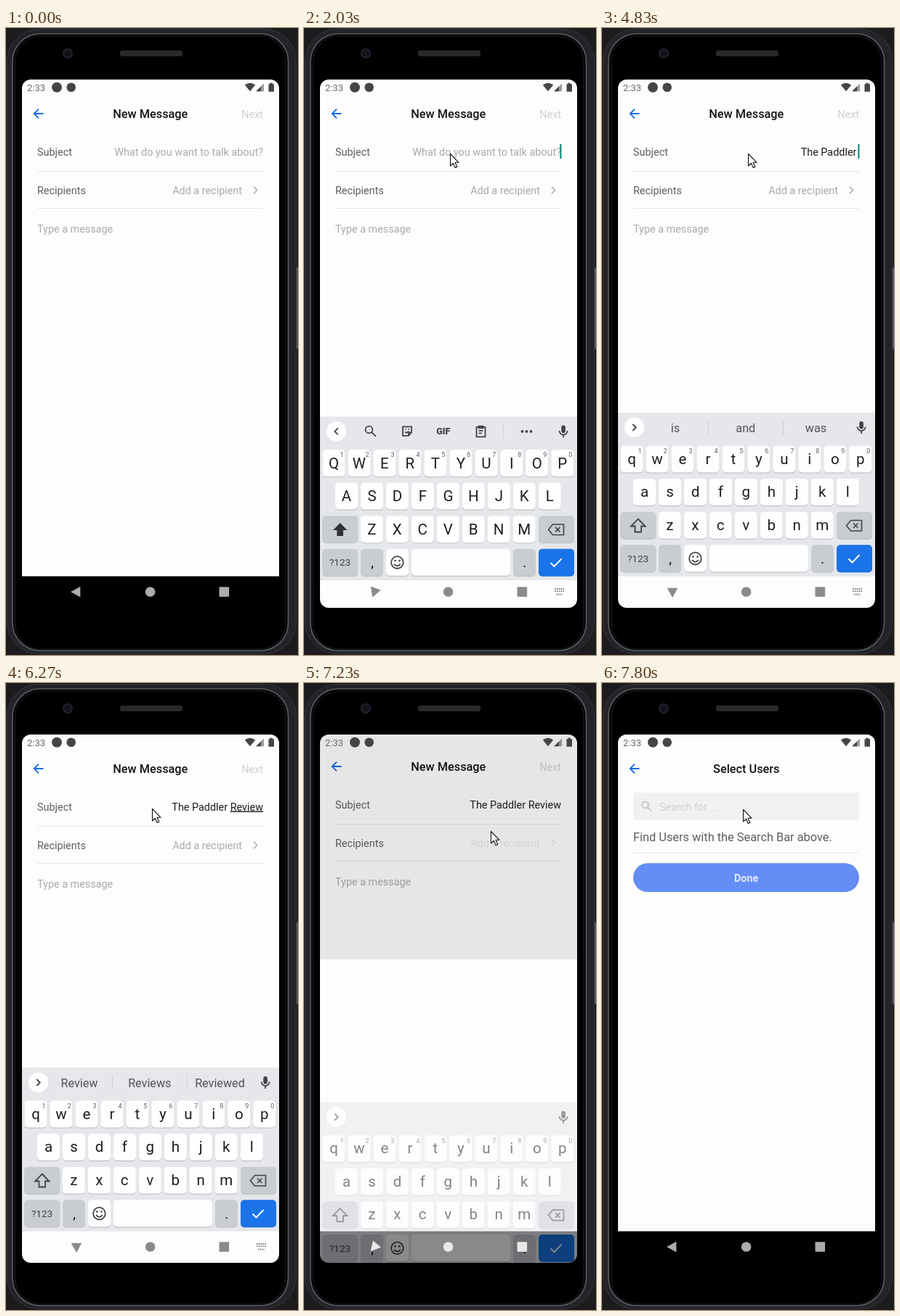
An HTML page for the animation above (8 s loop, 402x864 px).

```html
<!DOCTYPE html>
<html lang="en">
<head>
<meta charset="utf-8">
<title>New Message</title>
<style>
html, body { margin: 0; width: 100%; height: 100%; overflow: hidden; background: #1c1c1e; }
svg { display: block; width: 402px; height: 864px; font-family: Roboto, sans-serif; font-size: 14.4px; }
text { white-space: pre; }
.title { font-size: 16.3px; font-weight: 500; fill: #141414; }
.label { fill: #5e5e60; }
.hint { fill: #a9a9b0; }
.mid { text-anchor: middle; }
.end { text-anchor: end; }
.rule { stroke: #e4e4e6; fill: none; }
.line { fill: none; stroke: #414347; stroke-width: 1.8; }
.key { fill: #fefefe; }
.alt { fill: #c9ccd1; }
.glyph { font-size: 20.5px; fill: #1c1d1f; }
.digit { font-size: 9px; fill: #5c5e62; }
.word { font-size: 16.2px; fill: #505256; }
.back { fill: none; stroke: #1c6ee6; stroke-width: 1.9; }
</style>
</head>
<body>
<svg id="stage" viewBox="0 0 402 864"></svg>
<script>
const LOOP = 8000, KB_HEIGHT = 269, VIEW = 459;
const PAPER = 'fill="#fdfdfd"', INK = 'fill="#414347"';
const SUBJECT = 'The Paddler Review';
const KEY_TIMES = [2700, 2900, 3100, 3370, 3730, 4000, 4130, 4270, 4400, 4530,
  4700, 4800, 5070, 5270, 5330, 5400, 5470, 5570];
const SUGGESTIONS = [
  [2700, 'To|The|This'], [2930, 'that|the|they'], [3170, 'they|The|then'],
  [3430, 'one|Paddler|only'], [3830, 'Part|Place|Past'], [4030, 'Part|Paper|Past'],
  [4170, 'Pads|Pad|Paddle'], [4300, 'Paddle|Paddy|Paddles'], [4570, 'Paddler|Paddle|Paddles'],
  [4830, 'is|and|was'], [5100, 'Road|River|Run'], [5300, 'Real|Read|Red'],
  [5400, 'Review|Rev|Reveal'], [5770, 'Review|Reviews|Reviewed'], [7100, '||']
];
const POINTER = [[730, 10, 206], [1170, 201, 173], [6470, 201, 173], [6800, 260, 214],
  [6930, 257, 204], [7350, 257, 204], [7760, 194, 174]];

const $ = id => document.getElementById(id);
const ramp = (t, a, b) => Math.min(1, Math.max(0, (t - a) / (b - a)));
const smooth = (t, a, b) => { const p = ramp(t, a, b); return p * p * (3 - 2 * p); };
const last = (list, t) => list.filter(item => item[0] <= t).pop();

// cubic-bezier(.208, .82, .25, 1), solved for x by bisection
function reveal(x) {
  const curve = (s, a, b) => 3 * a * s * (1 - s) ** 2 + 3 * b * s * s * (1 - s) + s ** 3;
  let lo = 0, hi = 1;
  for (let i = 0; i < 20; i++) {
    const s = (lo + hi) / 2;
    if (curve(s, .208, .25) < x) lo = s; else hi = s;
  }
  return x >= 1 ? 1 : curve(lo, .82, 1);
}

const text = (x, y, s, cls = '', extra = '') => `<text x="${x}" y="${y}" class="${cls}" ${extra}>${s}</text>`;
const path = (d, cls = 'line', extra = '') => `<path d="${d}" class="${cls}" ${extra}/>`;
const rect = (x, y, w, h, r, extra) => `<rect x="${x}" y="${y}" width="${w}" height="${h}" rx="${r}" ${extra}/>`;
const circle = (x, y, r, extra) => `<circle cx="${x}" cy="${y}" r="${r}" ${extra}/>`;

const header = s => path('M51.5 118H39M45 111.7L38.7 118L45 124.3', 'back') + text(198.8, 124, s, 'title mid');

function phone() {
  return rect(0, 0, 402, 864, 0, 'fill="#1c1c1e"') +
    rect(1.5, 1.5, 398, 861, 44, 'fill="#242428" stroke="#34343a"') +
    rect(9, 8, 379.5, 850, 38, 'fill="#000" stroke="#5c5c66" stroke-width="1.6"') +
    rect(12.5, 11, 372.5, 845, 35, 'fill="#000" stroke="#121214" stroke-width="2"') +
    rect(400, 330, 2, 112, 0, 'fill="#55555c"') +
    circle(85, 35, 6, 'fill="#121218" stroke="#222230" stroke-width="2"') +
    rect(157, 31, 86, 8, 3, 'fill="#29292b"');
}

function status() {
  return text(29, 86.5, '2:33', '', 'style="font-size:13px" fill="#6a6a6c"') +
    `<g fill="#454547">${circle(70, 81.7, 7, '')}${circle(89.7, 81.7, 6.3, '')}` +
    path('M328.8 78.5Q336 73 343.2 78.5L336 87.3Z', '') +
    path('M355 76.5V87.3H344.2Z', '', 'opacity=".55"') + path('M351 80.5V87.3H344.2Z', '') +
    path('M363.2 75.8H366.8V77.2H369V87.8H361.5V77.2H363.2Z', '') + '</g>';
}

function compose() {
  return rect(22, 60, 354, 705, 0, PAPER) + header('New Message') +
    text(354, 123.5, 'Next', 'end', 'fill="#cfcfd2"') +
    text(43, 175.5, 'Subject', 'label') +
    text(354, 175.5, '<tspan id="typed"></tspan><tspan id="word" text-decoration="underline"></tspan>', 'end', 'fill="#1e1e1e"') +
    text(354, 175.5, 'What do you want to talk about?', 'hint end', 'id="prompt"') +
    rect(352.4, 160, 2, 20, 0, 'fill="#008577" id="caret"') +
    path('M43 197.5H354M43 248.5H354', 'rule') +
    text(43, 228.7, 'Recipients', 'label') +
    `<g id="recipient">${text(325, 228.7, 'Add a recipient', 'hint end')}` +
    path('M340.8 218.7L345.6 223.5L340.8 228.3', '', 'fill="none" stroke="#a9a9b0" stroke-width="1.5"') + '</g>' +
    text(43, 281.7, 'Type a message', 'hint');
}

function picker() {
  return header('Select Users') + rect(43, 151, 311, 38, 2, 'fill="#f1f1f2"') +
    `<g fill="none" stroke="#c4c4c8" stroke-width="1.8">${circle(59.5, 168, 4.4, '')}<path d="M62.7 171.2L68 176.5"/></g>` +
    text(79, 175.5, 'Search for ...', '', 'fill="#cfcfd3"') +
    text(43, 217.7, 'Find Users with the Search Bar above.', 'label', 'style="font-size:16.35px"') +
    path('M43 234H354', 'rule') + rect(43, 248.3, 311, 39.7, 19.8, 'fill="#648df5"') +
    text(198.6, 274, 'Done', 'mid', 'fill="#e2e9fb" font-weight="700"');
}

const mic = rect(354.3, 542, 5.6, 10.5, 2.8, INK) +
  path('M351.5 549.5a5.6 5.6 0 0 0 11.2 0M357.1 555.3V559', 'line');

function toolbar() {
  return path('M46.8 546L42.3 550.5L46.8 555') +
    `<g class="line">${circle(89.5, 548, 4.8, '')}<path d="M93 551.5L99 557.5"/></g>` +
    path('M136 544H148V552L144 556.5H136ZM148 552H144V556.5M139 551Q141.5 554 144 550M139 547.5h1.5M143.5 547.5h1.5') +
    text(191.8, 555, 'GIF', 'mid', 'font-weight="900" style="font-size:12.5px" ' + INK) +
    path('M237.5 544.5H249.5V558H237.5ZM240.5 543.3H246.5V546H240.5ZM240.5 549.5H246.5M240.5 553H245') +
    path('M274.5 541V560', 'line', 'style="stroke-width:1;stroke:#cdd0d5"') +
    [300.5, 306.5, 312.5].map(x => circle(x, 550.5, 1.9, INK)).join('');
}

function strip() {
  return path('M42.3 546L46.8 550.5L42.3 555') +
    `<path id="bars" d="M146.5 540V561M249.5 540V561" stroke="#cdd0d5"/>` +
    [101, 197.8, 294.5].map((x, i) => text(x, 556.5, '', 'word mid', `id="sug${i}"`)).join('');
}

function keyboard() {
  let keys = '', caps = '', small = '';
  const key = (x, y, w, cls = 'key') => {
    keys += rect(x, y + 1.2, w, 37, 5, 'fill="#bfc2c7"') + rect(x, y, w, 37, 5, `class="${cls}"`);
  };
  [['qwertyuiop', 41, 575.5], ['asdfghjkl', 58.5, 621], ['zxcvbnm', 93.3, 666.7]].forEach(([row, x0, y], r) => {
    [...row].forEach((c, i) => {
      const x = x0 + i * 34.97;
      key(x - 15.5, y, 31);
      caps += text(x, y + 26, c.toUpperCase(), 'glyph mid');
      small += text(x, y + 25, c, 'glyph mid');
      if (!r) keys += text(x + 11, y + 10.5, (i + 1) % 10, 'digit mid');
    });
  });
  key(25.3, 666.7, 49, 'alt'); key(323, 666.7, 49, 'alt');
  key(25.3, 712.3, 49, 'alt'); key(78, 712.3, 31, 'alt'); key(113, 712.3, 31);
  key(148, 712.3, 136); key(288, 712.3, 31, 'alt');
  keys += rect(323, 712.3, 49, 38, 5, 'fill="#1a73e8"') +
    path('M339.5 731.5L344.5 736.5L354.5 726', 'line', 'style="stroke:#fff;stroke-width:2"') +
    path('M342.5 678.5H357.5V693H342.5L336.5 685.7ZM346 682.5L352.5 689M352.5 682.5L346 689', 'line', 'style="stroke-width:1.6"') +
    text(49.5, 736, '?123', 'mid', 'style="font-size:13.5px" ' + INK) +
    text(94, 738, ',', 'mid', 'style="font-size:18px"') + text(303.5, 738, '.', 'mid', 'style="font-size:18px"') +
    `<g class="line">${circle(128.4, 731, 8.3, '')}<path d="M124 733.2Q128.4 738.4 132.8 733.2"/></g>` +
    circle(125.4, 728.5, 1.3, INK) + circle(131.4, 728.5, 1.3, INK);
  const arrow = 'M49.7 676.5L59.5 686.5H54V694.5H45.4V686.5H40Z';
  return rect(22, 530, 354, 230, 0, 'fill="#e5e7eb"') + rect(22, 755.5, 354, 330, 0, PAPER) +
    circle(44.5, 550.3, 13.6, 'fill="#fefefe"') + mic + keys +
    `<g id="caps">${toolbar()}${caps}${path(arrow, '', 'fill="#303236"')}</g>` +
    `<g id="small">${strip()}${small}${path(arrow)}</g>`;
}

const nav = () => `<g id="nav">${path('M89 777L102.3 769.7V784.3Z', '', 'id="backKey"')}` +
  circle(198.6, 777, 6.8, '') + rect(293.5, 770.2, 13.6, 13.6, 1, '') +
  `<path id="imeKey" d="M345 773H358M345 776.2H358M347 780.5H356" stroke-width="1.8" stroke-dasharray="1.8 1"/></g>`;

$('stage').innerHTML = `
  <clipPath id="screen">${rect(22, 71, 354, 728, 12, '')}</clipPath>
  <clipPath id="sheet"><rect id="sheetEdge" x="22" width="354" height="900"/></clipPath>
  ${phone()}
  <g clip-path="url(#screen)">
    <g id="compose">${compose()}</g>
    <rect id="dim" x="22" y="71" width="354" height="684"/>
    <g id="picker" clip-path="url(#sheet)">
      ${rect(22, 71, 354, 690, 0, PAPER)}<g id="pickerBody">${picker()}</g>
    </g>
    ${status()}
    ${rect(22, 755.5, 354, 44, 0, 'fill="#000"')}
    <g id="keyboard">${keyboard()}</g>
    ${nav()}
  </g>
  <path id="pointer" d="M.5 .5V17L4.3 13.3L7.2 19.6L9.8 18.4L7 12.3H12Z" fill="#fff" stroke="#111" stroke-width="1.1" stroke-linejoin="round"/>`;

const set = (id, name, value) => $(id).setAttribute(name, value);
const show = (id, on) => { $(id).style.display = on ? '' : 'none'; };
const move = (id, x, y) => set(id, 'transform', `translate(${x} ${y})`);

function drawPointer(t) {
  show('pointer', t >= POINTER[0][0]);
  const i = Math.max(0, POINTER.filter(p => p[0] <= t).length - 1);
  const a = POINTER[i], b = POINTER[i + 1] || a;
  const p = a === b ? 0 : smooth(t, a[0], b[0]);
  move('pointer', a[1] + (b[1] - a[1]) * p, a[2] + (b[2] - a[2]) * p);
}

function drawSubject(t) {
  const typed = SUBJECT.slice(0, KEY_TIMES.filter(k => k <= t).length);
  const cut = typed.lastIndexOf(' ') + 1, editing = t < 7100;
  $('typed').textContent = editing ? typed.slice(0, cut) : typed;
  $('word').textContent = editing ? typed.slice(cut) : '';
  show('prompt', !typed);
  const on = t < 2200 ? t >= 1670 : t >= 2700 && (t < 6270 || t >= 6770);
  show('caret', on && editing);
}

function drawKeyboard(t) {
  const opening = t < 4000;
  const open = opening ? smooth(t, 1825, 2050) : 1 - smooth(t, 7172, 7392);
  const alpha = opening ? ramp(t, 1878, 1990) : 1 - ramp(t, 7170, 7303);
  const turn = opening ? smooth(t, 1940, 2070) : 1 - smooth(t, 7165, 7305);
  move('keyboard', 0, (1 - open) * KB_HEIGHT);
  set('keyboard', 'opacity', alpha);
  show('caps', t < 2700);
  show('small', t >= 2700);
  const words = (last(SUGGESTIONS, t) || [0, '||'])[1].split('|');
  words.forEach((w, i) => { $('sug' + i).textContent = w; });
  show('bars', words[0]);
  const color = t > 7180 && t < 7480 ? '#e8e8e8' : alpha > .5 ? '#8a8a8a' : '#acacac';
  set('nav', 'fill', color);
  set('imeKey', 'stroke', color);
  show('imeKey', t > 1850 && t < 7190);
  set('backKey', 'transform', `rotate(${-90 * turn} 97 777)`);
}

function drawScreens(t) {
  const p = reveal(ramp(t, 7195, 7620)), rest = VIEW * (1 - p);
  move('compose', 0, -.02 * VIEW * p);
  set('recipient', 'opacity', t >= 7100 ? .25 : 1);
  set('dim', 'opacity', .1 * Math.min(1, p / .36));
  show('picker', p > 0);
  set('sheetEdge', 'y', 71 + rest);
  move('pickerBody', 0, .041 * rest);
}

function frame() {
  const t = performance.now() % LOOP;
  drawScreens(t);
  drawSubject(t);
  drawKeyboard(t);
  drawPointer(t);
  requestAnimationFrame(frame);
}
frame();
</script>
</body>
</html>
```
